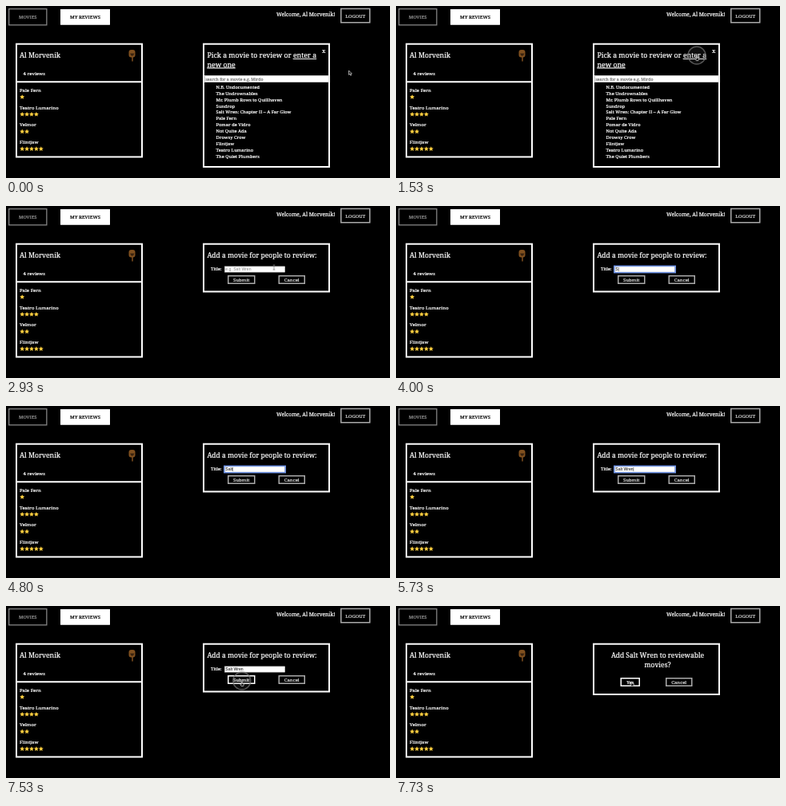
Animation, 480 px wide and 216 px high, one loop 8000 ms. Source, as an HTML page:

```html
<!DOCTYPE html>
<html lang="en">
<head>
<meta charset="utf-8">
<title>Movie reviews</title>
<style>
  html, body { margin: 0; width: 100%; height: 100%; overflow: hidden; background: #000; }
  svg { display: block; width: 480px; height: 216px; font-family: "Noto Serif", serif; }
  text { stroke-width: .22px; }
  .field { font-family: "Liberation Sans", Arial, sans-serif; stroke-width: 0; }
</style>
</head>
<body>
<svg id="stage" viewBox="0 0 480 216"></svg>
<script>
const stage = document.getElementById('stage');
const LOOP = 8000, STEP = 1000 / 15;
const USER = 'Al Morvenik', TITLE = 'Salt Wren';
const REVIEWS = [['Pale Fern', 1], ['Teatro Lumarino', 4], ['Velmor', 2], ['Flintjaw', 5]];
const MOVIES = ['N.B. Undocumented', 'The Undrownables', 'Mr. Plumb Rows to Quillhaven', 'Sundrop',
  'Salt Wren: Chapter II – A Far Glow', 'Pale Fern', 'Pomar de Vidro', 'Not Quite Ada', 'Drowsy Crow',
  'Flintjaw', 'Teatro Lumarino', 'The Quiet Plumbers'];
const KEYS = [4000, 4200, 4530, 4800, 5000, 5200, 5400, 5530, 5730];
const FOCUS = 3030, BLUR = 7530;

// Cursor stops: time, x, y
const PATH = [[200, 428.5, 81], [470, 380, 57], [600, 380, 57], [870, 261, 68], [1070, 396, 64], [1200, 376, 62],
  [2330, 376, 62], [2930, 335, 77], [3130, 335, 79], [6070, 333, 79], [6400, 300, 102],
  [6600, 295.2, 97], [6800, 294.8, 94]];

const text = (x, y, size, s, fill = '#fff', extra = '') =>
  `<text x="${x}" y="${y}" font-size="${size}" fill="${fill}" stroke="${fill}" ${extra}>${s}</text>`;
const mid = (x, y, size, s, fill) => text(x, y, size, s, fill, 'text-anchor="middle"');
// Outer bounds with the line drawn inside
const box = (x, y, r, b, line, w, fill = 'none') =>
  `<rect x="${x + w / 2}" y="${y + w / 2}" width="${r - x - w}" height="${b - y - w}" fill="${fill}" stroke="${line}" stroke-width="${w}"/>`;
const button = (x, y, r, b, s, hot) =>
  box(x, y, r, b, hot ? '#fff' : '#aaa', 1.5) + mid((x + r) / 2, (y + b) / 2 + 2.1, 6, s, hot ? '#fff' : '#ddd');

function star(x, y) {
  const pts = Array.from({ length: 10 }, (_, i) => {
    const a = i * Math.PI / 5, r = i % 2 ? 1.5 : 3.1;
    return (x + r * Math.sin(a)).toFixed(2) + ',' + (y - r * Math.cos(a)).toFixed(2);
  });
  return `<polygon points="${pts.join(' ')}" fill="#ffd040"/>`;
}

function page() {
  let s = box(3, 3, 51.5, 24.5, '#858585', 1.3) + mid(27.2, 16.4, 5.8, 'MOVIES', '#999')
    + box(68, 4, 130, 23.7, '#fff', 1, '#fff') + mid(99, 16.4, 6, 'MY REVIEWS', '#000')
    + text(338, 13.2, 6.6, `Welcome, ${USER}!`)
    + box(418, 2.7, 455.5, 21.5, '#aaa', 1.5) + mid(436.8, 14.6, 6, 'LOGOUT', '#ddd')
    + box(12, 46.7, 171, 190.5, '#fff', 2) + '<path d="M12 95.3H171" stroke="#fff" stroke-width="2"/>'
    + text(17, 65, 8.6, USER) + text(21.5, 87, 6, '4 reviews')
    + '<rect x="153.5" y="55" width="8" height="9.5" rx="3" fill="#80501f"/>'
    + '<path d="M155 59.5H160.5L159 62.5H156.5Z" fill="#3a2410"/>'
    + '<path d="M158 64V69.5" stroke="#80501f" stroke-width="1.5"/>';
  REVIEWS.forEach(([name, n], i) => {
    const y = 108 + i * 21.7;
    s += text(17, y, 6, name);
    for (let k = 0; k < n; k++) s += star(20.2 + k * 5.9, y + 6.3);
  });
  return s;
}

function picker() {
  const link = s => `<tspan text-decoration="underline">${s}</tspan>`;
  return box(246, 46.7, 405, 203, '#fff', 2)
    + text(251.5, 65, 8.7, 'Pick a movie to review or ' + link('enter a'))
    + text(251.5, 76.5, 8.7, link('new one'))
    + text(395, 58.8, 7.5, 'x')
    + box(248, 87, 403.5, 96, '#ccc', 0.6, '#fff')
    + text(249.5, 93.6, 5.2, 'search for a movie e.g. Mirdo', '#777', 'stroke-width="0"')
    + MOVIES.map((m, i) => text(262.5, 104 + i * 7.87, 5.75, m)).join('');
}

function form(t, y) {
  const typed = KEYS.filter(k => t >= k - 5).length;
  const focused = t >= FOCUS && t < BLUR - 5;
  let s = box(246, 46.7, 405, 108.5, '#fff', 2)
    + text(251.5, 65, 8.5, 'Add a movie for people to review:')
    + text(256, 81.2, 5.7, 'Title:')
    + box(273, 75.6, 349, 83.4, '#bbb', 0.6, '#fff');
  if (focused) s += box(272, 74.6, 350, 84.4, '#6f94e8', 1.5);
  const blink = Math.floor((t + 5 - (typed ? KEYS[typed - 1] : FOCUS)) / 500) % 2 === 0;
  const caret = focused && blink ? '<tspan dx="-.3">|</tspan>' : '';
  s += typed
    ? text(274.3, 81.3, 5.1, TITLE.slice(0, typed) + caret, '#000', 'class="field" xml:space="preserve"')
    : text(274.3, 81.3, 5.1, 'e.g. ' + TITLE, '#888', 'class="field"')
      + (caret && text(273.4, 81.3, 5.1, '|', '#000', 'class="field"'));
  return s + button(277, 87, 311.5, 98, 'Submit', t > 6400 && y < 99) + button(340.5, 87, 374, 98, 'Cancel');
}

const confirmBox = () => box(246, 46.7, 405, 112, '#fff', 2)
  + mid(327, 65, 8.5, `Add ${TITLE} to reviewable`) + mid(327, 77, 8.5, 'movies?')
  + button(280.5, 90, 305, 101, 'Yes', true) + button(337, 90, 370.5, 101, 'Cancel');

function position(t) {
  const i = PATH.findIndex(p => p[0] > t);
  if (i === 0) return PATH[0].slice(1);
  if (i < 0) return PATH[PATH.length - 1].slice(1);
  const [t0, x0, y0] = PATH[i - 1], [t1, x1, y1] = PATH[i];
  const k = (t - t0) / (t1 - t0);
  return [x0 + (x1 - x0) * k, y0 + (y1 - y0) * k];
}

const SHAPES = {
  arrow: 'M0 0V5.4L1.3 4.3L2.2 6.3L3.1 5.9L2.2 4H3.9Z',
  hand: 'M-.5 1H.4V3.2L2.4 3.7V5L1.8 6.6H-.7L-2 4.4L-1.4 3.9L-.5 4.5Z',
  beam: 'M-1.4 -3H1.4M0 -3V3M-1.4 3H1.4'
};

function cursor(t, x, y) {
  if (t >= 3995 && t < 6125) return '';
  const overForm = t >= 1660 && t < 6400 && y < 84;
  const hand = t >= 1195 && t < 1660 || t >= 6660;
  const kind = overForm ? 'beam' : hand ? 'hand' : 'arrow';
  const line = kind === 'beam' ? '#777' : '#ddd';
  return `<path transform="translate(${x} ${y})" d="${SHAPES[kind]}" fill="#111" stroke="${line}" stroke-width=".7"/>`;
}

const ring = (x, y) =>
  `<circle cx="${x}" cy="${y}" r="11" fill="#777" fill-opacity=".12" stroke="#777" stroke-opacity=".7" stroke-width="1.5"/>`;

const base = page();
let last = -1;
function draw(now) {
  const n = Math.floor((now % LOOP) / STEP + 0.06);
  if (n !== last) {
    last = n;
    const t = n * STEP, [x, y] = position(t);
    const panel = t < 1660 ? picker() : t < 7660 ? form(t, y) : confirmBox();
    const pressed = t >= 1525 && t < 1660 || t >= 7525 && t < 7660;
    stage.innerHTML = base + panel + (pressed ? ring(x, y) : '') + cursor(t, x, y);
  }
  requestAnimationFrame(draw);
}
draw(performance.now());
</script>
</body>
</html>
```
